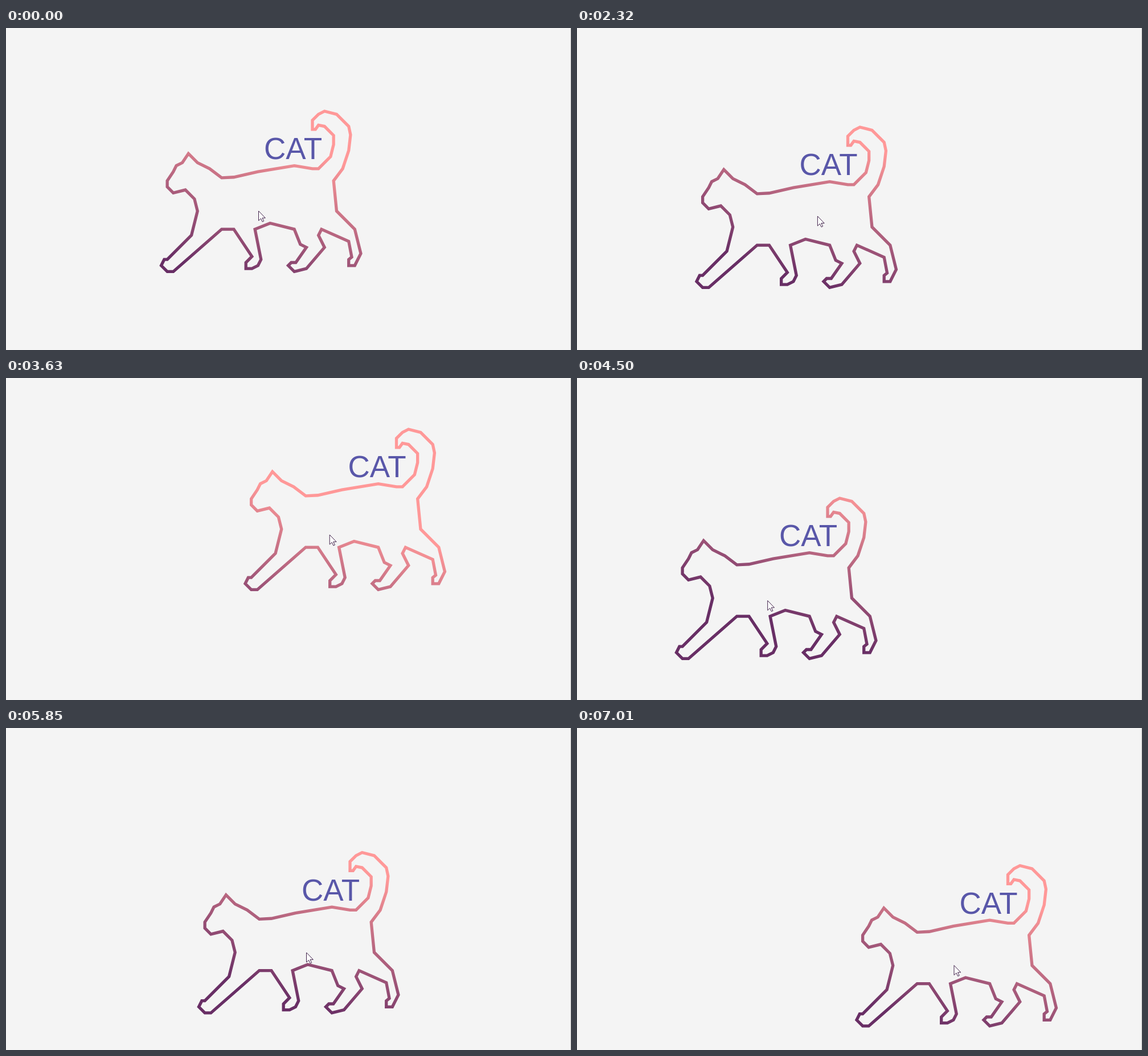
Write an HTML page that moves like this. It is 992 px wide and 565 px high and loops after 7740 ms.

```html
<!DOCTYPE html>
<html lang="en">
<head>
<meta charset="utf-8">
<title>Dragged cat</title>
<style>
  html, body { margin: 0; width: 100%; height: 100%; overflow: hidden; background: #f4f4f4; }
  svg { display: block; width: 992px; height: 565px; }
  text { font: 53px "Liberation Sans", Arial, sans-serif; fill: #5957a9; }
</style>
</head>
<body>
<svg viewBox="0 0 992 565">
  <defs>
    <linearGradient id="fade" gradientUnits="userSpaceOnUse" x1="300" y1="408" x2="388" y2="164">
      <stop offset="0" stop-color="#682e65"/>
      <stop offset="1" stop-color="#ff9898"/>
    </linearGradient>
  </defs>
  <rect width="992" height="565" fill="#f4f4f4"/>
  <rect x="991" width="1" height="565" fill="#c8c8c8"/>
  <!-- drawn on a coarse grid, one line width per cell -->
  <path id="cat" fill="none" stroke="url(#fade)" d="M9 14l3 3 4 2 4 3 4-.2 8-1.8 12-2 6 1h2
    l4-4 1-4v-3l-3-3-2-.4-1 1.4h-1v-3l2-2 2-1 4 1 4 4 .6 2.8-.6 5.200-2 6-3 4 1 10 6 6 2 8-2 4
    h-2v-2l1-.8-1-5.200-9-4-1 2 2 4-6 7-4 1-2-2 1-1h1.500l3.500-5-2-1-2-5-8-2-5 2 2 10-1 2-2 1
    h-2v-2l2-2-6-9h-4l-16 14h-2l-2-2 1-2h1l8-8 2-8-1-4-3-3-4 1-2-2v-2l2-3 1-2 2-1z"/>
  <text id="label" x="453" y="230">CAT</text>
  <path id="cursor" fill="#fff" stroke="#40224a" d="M443.500 321v17l4-3.700 2.700 5.700 2.500-1.200-2.700-5.500h5.300z"/>
</svg>
<script>
const LOOP = 7740;
const STEP = 67;  // usual time between two refreshes while dragging
const LAG = 105;  // the cat trails the pointer by this many ms
const CELL = 5.31, LEFT = 272.5, TOP = 146;

// time and offset where a drag starts, passes or rests
const stops = [
  [775, 0, 0], [1380, -110, 48], [1850, -163, 77],
  [1985, -163, 77], [2320, -62.5, 28], [2820, 132, -55], [3210, 174, -66],
  [3420, 174, -66], [3630, 147.5, -56], [4500, -98, 65], [4770, -117, 73],
  [5050, -117, 73], [5850, 66, 72.5], [7010, 218.5, 95.5]
];
const last = stops.length - 1;

const get = id => document.getElementById(id);
const cat = get("cat"), label = get("label"), cursor = get("cursor"), fade = get("fade");

const legAt = t => Math.min(last - 1, Math.max(0, stops.findLastIndex(stop => stop[0] <= t)));
const slope = (i, c) => (stops[i + 1][c] - stops[i][c]) / (stops[i + 1][0] - stops[i][0]);

// Monotone tangent: flat at turning points and at rests
function tangent(i, c) {
  if (i === 0 || i === last) return 0;
  const a = slope(i - 1, c), b = slope(i, c);
  return a * b > 0 ? 2 * a * b / (a + b) : 0;
}

function position(t) {
  const i = legAt(t), a = stops[i], b = stops[i + 1], span = b[0] - a[0];
  const u = Math.min(1, Math.max(0, (t - a[0]) / span)), v = 1 - u;
  return [1, 2].map(c =>
    a[c] * v * v * (1 + 2 * u) + b[c] * u * u * (3 - 2 * u) +
    span * u * v * (tangent(i, c) * v - tangent(i + 1, c) * u));
}

// Each leg is shown in equal steps of about STEP ms
function refreshTime(t) {
  const i = legAt(t), start = stops[i][0], span = stops[i + 1][0] - start;
  const gap = span / Math.round(span / STEP);
  return start + gap * Math.floor((t - start) / gap + 1e-6);
}

function draw(t) {
  const shown = refreshTime(t);
  const [x, y] = position(shown);
  cat.setAttribute("transform", `translate(${LEFT + x} ${TOP + y}) scale(${CELL})`);
  // undo the move, so that the colours stay fixed to the page
  fade.setAttribute("gradientTransform", `scale(${1 / CELL}) translate(${-LEFT - x} ${-TOP - y})`);
  label.setAttribute("transform", `translate(${x} ${y})`);
  cursor.setAttribute("transform", `translate(${position(shown + LAG)})`);
}

function tick() {
  draw(performance.now() % LOOP);
  requestAnimationFrame(tick);
}
tick();
</script>
</body>
</html>
```
